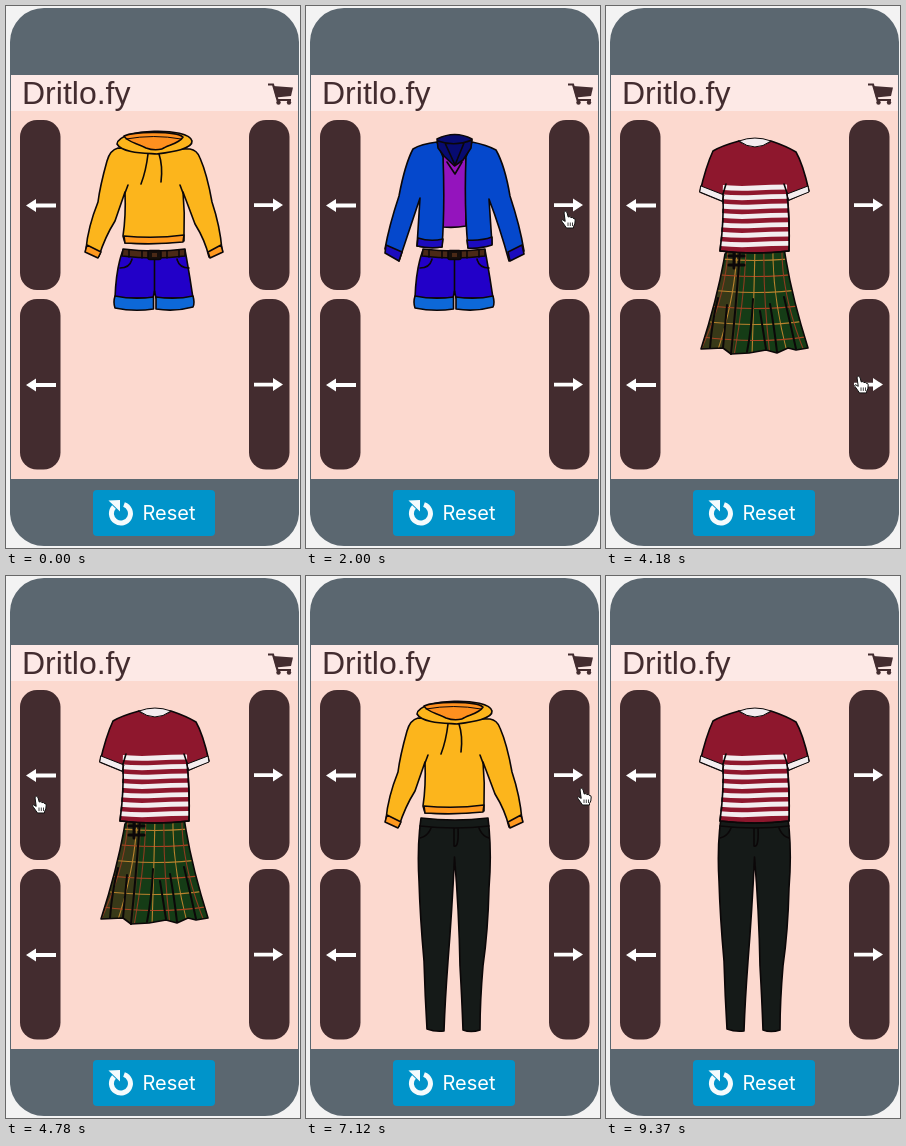
These frames come from a looping animation (294 by 542 pixels, 9.79 s). An HTML page:

```html
<!DOCTYPE html>
<html lang="en">
<head>
<meta charset="utf-8">
<title>Outfit picker</title>
<style>
  html, body { margin: 0; width: 100%; height: 100%; overflow: hidden; background: #f3f3f3; }
  svg { display: block; width: 294px; height: 542px; }
  .garment { stroke: #0b0708; stroke-width: 1.6; stroke-linejoin: round; stroke-linecap: round; }
  .line { fill: none; }
  .hover { filter: drop-shadow(2px 2px 2.5px rgba(0, 0, 0, .3)); }
</style>
</head>
<body>
<svg viewBox="0 0 294 542">
  <defs>
    <clipPath id="teeBody"><path d="M117 178H181L183 245Q149 248 114 245Z"/></clipPath>
    <clipPath id="skirtShape"><path d="M125 241Q150 245 178 241Q184 285 202 342L190 344 182 342 171 347 160 344 143 347 125 348 117 342 95 343Q112 290 119 248Z"/></clipPath>
    <path id="leftArrow" d="M20 199.500L30 193V197.500H50V201.500H30V206Z" fill="#fff"/>
    <path id="rightArrow" d="M277 199L267 192.500V197.300H248V200.900H267V205.500Z" fill="#fff"/>
  </defs>

  <rect x="4" y="2" width="289" height="538" rx="34" fill="#5b6770"/>
  <rect x="5" y="69" width="287" height="404" fill="#fcd9cf"/>
  <rect x="5" y="69" width="287" height="36" fill="#fde9e6"/>
  <text x="16" y="98" font-family="'Liberation Sans', Arial, sans-serif" font-size="32" fill="#432c2f">Dritlo.fy</text>

  <g fill="#432c2f">
    <path d="M262 78.500H267L271.500 94H285" fill="none" stroke="#432c2f" stroke-width="2.200"/>
    <path d="M267 80L287 81.500 285 90 270 91.500Z"/>
    <circle cx="272.500" cy="96.500" r="2.200"/><circle cx="283" cy="96.500" r="2.200"/>
    <rect x="14" y="114" width="40.500" height="170" rx="17"/>
    <rect x="243" y="114" width="40.500" height="170" rx="17"/>
    <rect x="14" y="293" width="40.500" height="170.500" rx="17"/>
    <rect x="243" y="293" width="40.500" height="170.500" rx="17"/>
  </g>
  <use href="#leftArrow"/><use href="#leftArrow" y="179.500"/>
  <use href="#rightArrow"/><use href="#rightArrow" y="179.500"/>

  <g id="reset">
    <rect x="87" y="484" width="122" height="46" rx="4" fill="#0094ca"/>
    <path d="M118 498.500A9.500 9.500 0 1 1 108 501" fill="none" stroke="#f4fbfd" stroke-width="5"/>
    <path d="M102.500 494.500L114 494V505.500Z" fill="#f4fbfd"/>
    <text x="136.500" y="514" font-family="Inter, sans-serif" font-size="20" fill="#fff">Reset</text>
  </g>

  <g id="shorts" class="garment">
    <path d="M117 244Q149 249 179 244Q183 265 187 292H150L148.500 285 147 292H109Q110 262 117 244Z" fill="#2200c8"/>
    <path d="M109 290Q128 294 147.500 291V303Q128 306 109 302Q107 296 109 290ZM150 291Q170 294 187 290Q189 297 187 301Q169 306 150 303Z" fill="#0d68d8"/>
    <path d="M117 243Q149 247 179 243V250Q149 254 116 250Z" fill="#4a2917"/>
    <rect x="142" y="244.500" width="13" height="9" rx="2" fill="#160e0b"/>
    <rect x="146" y="247" width="5" height="4" fill="#4a2917" stroke="none"/>
    <path class="line" d="M123 244V251M136 245V252M161 245V252M173 244V251M148.500 254V286M126 253Q124 262 114 262M171 253Q173 262 183 262"/>
  </g>

  <g id="pants" class="garment">
    <path d="M115 242Q149 246 182 242Q186 275 183 312Q182 355 177 390Q174 425 174 454Q165 457 157 454Q156 425 154 390Q153 335 148.500 281Q146 335 142 385Q139 425 138 455Q129 456 121 453Q119 420 118 385Q114 340 113 305Q111 270 115 242Z" fill="#151a18"/>
    <path class="line" d="M114 250Q149 254 183 250M148 252V270Q153 272 152 252M125 252Q122 260 114 262M173 252Q176 260 183 262"/>
  </g>

  <g id="skirt" class="garment">
    <g id="plaid" clip-path="url(#skirtShape)" fill="none">
      <rect x="90" y="238" width="116" height="115" fill="#153c16" stroke="none"/>
      <path d="M125 238H137L127 352H90Z" fill="#57371a" fill-opacity=".55" stroke="none"/>
    </g>
    <path class="line" d="M125 241Q150 245 178 241Q184 285 202 342L190 344 182 342 171 347 160 344 143 347 125 348 117 342 95 343Q112 290 119 248Z"/>
    <path class="line" stroke-width="2" d="M134 244Q130 300 125 348M112 292Q106 315 104 342M147 293Q146 320 141 346M164 298Q168 320 171 346M178 291Q185 320 190 343M121 299L117 342M154 305L160 343"/>
    <path class="line" stroke-width="3" d="M123 250H138M123 259H138M128 247V262"/>
  </g>

  <g id="hoodie" class="garment" fill="#fcb51c">
    <path d="M112 142Q104 144 101 155Q94 180 92 196Q82 221 80 243L93 250Q99 231 109 215L119 186Q120 210 117 230L119 237Q149 239 178 235V229Q179 207 177 186L189 218Q199 234 203 251L216 244Q214 220 206 196Q201 168 194 152Q191 144 184 143Z"/>
    <path d="M81 239L95 246 92 252 79 246ZM202 246L215 239 217 246 204 252ZM118 230Q149 233 178 229L177 236Q149 239 119 237Z" fill="#ff981f"/>
    <path d="M111 138C113 122 183 121 186 135C187 143 165 146 151 148C138 147 116 147 111 138Z"/>
    <path d="M118 130C129 125 170 125 177 131C173 138 161 139 156 143Q148 145 140 142C131 137 121 136 118 130Z" fill="#ff901f"/>
    <path class="line" d="M120 133Q148 128 175 133" stroke-width="1"/>
    <path class="line" d="M142 148Q140 165 135 178M153 148Q157 160 155 176M119 187L122 179M177 187L174 179"/>
  </g>

  <g id="jacket" class="garment">
    <path d="M137 148H160V220Q149 222 137 221Z" fill="#9414bd"/>
    <path d="M131 136Q115 138 107 143Q99 158 93 190Q83 220 79 243L93 255Q104 222 114 192L111 240Q124 243 136 241Q139 200 137 151ZM166 136Q181 139 190 144Q199 160 204 190Q214 220 218 245L203 255Q194 222 183 193L186 238Q174 243 162 242Q158 200 160 151Z" fill="#0548cc"/>
    <path d="M80 239L96 246 93 255 79 247ZM202 246L216 239 218 248 204 255ZM112 232Q124 236 137 233L136 241Q124 243 111 240ZM161 234Q175 235 186 231V239Q173 243 162 242Z" fill="#1c0bbe"/>
    <path d="M131 133Q149 124 166 133L165 142 157 154 148.500 160 138 150 132 142Z" fill="#070b70"/>
    <path class="line" d="M132 135Q149 141 166 134M139 137L149 159 158 137M141 156L149 168 156 156"/>
  </g>

  <g id="tee" class="garment">
    <path d="M133 135Q115 140 107 145Q100 160 94 186L116 195 117 188Q118 215 114 245Q149 249 183 245Q184 215 181 187L183 194 203 185Q197 158 190 146Q180 140 165 135Q149 145 133 135Z" fill="#8e172d"/>
    <g id="stripes" clip-path="url(#teeBody)" fill="none" stroke="#f3edef" stroke-width="4.800"/>
    <path d="M133 135Q149 129 165 135Q149 147 133 135ZM95 180L118 189 116 195 94 186ZM181 188L202 180 203 186 183 194Z" fill="#f3edef" stroke-width="1"/>
    <path class="line" d="M117 188Q118 215 114 245Q149 249 183 245Q184 215 181 187M117 188L120 178M181 187L178 178"/>
  </g>

  <g id="cursor" fill="#fff" stroke="#111" stroke-linejoin="round">
    <g id="hand">
      <path d="M-2 1.500q1.500-2.500 3 0l1.200 4.500q2-1 2.600.6 2-.6 2.400.8 2-.2 2 1.600l-.4 4-1.300 2.500v1.500h-7l-3.500-5q-2.500-3-.4-3.200l2.600 1.600Z"/>
      <path d="M2 11.500V15M4.300 11.500V15M6.500 11.500V15" stroke-width=".8"/>
    </g>
    <path id="pointer" d="M0 0V14L3.300 11 5.500 16 7.800 15 5.700 10.200H10Z" fill="#111" stroke="#fff"/>
  </g>
</svg>

<script>
const LOOP = 9790;
const $ = id => document.getElementById(id);
const show = (id, on) => { $(id).style.display = on ? '' : 'none'; };

// [time, garment]
const tops = [[0, 'hoodie'], [2000, 'jacket'], [2540, 'tee'], [4960, 'jacket'],
              [5500, 'hoodie'], [7350, 'jacket'], [8010, 'tee']];
const bottoms = [[0, 'shorts'], [3410, 'pants'], [4070, 'skirt'], [6040, 'pants']];

// [first step, last step, step count, points along the way]
const moves = [
  [600, 720, 3, [[284, 196], [266, 201]]],
  [1280, 1340, 2, [[266, 201], [260, 204]]],
  [1520, 1520, 1, [[260, 204], [260, 205]]],
  [2600, 2940, 7, [[260, 205], [255, 371]]],
  [3110, 3230, 3, [[255, 371], [262, 374]]],
  [4130, 4780, 12, [[262, 374], [110, 305], [5, 245], [31, 220]]],
  [5260, 5260, 1, [[31, 220], [32, 220]]],
  [5620, 5860, 5, [[32, 220], [27, 300], [32, 357]]],
  [6220, 6700, 9, [[32, 357], [170, 270], [283, 211]]],
  [7000, 7120, 3, [[283, 211], [276, 212]]],
  [8190, 8770, 11, [[276, 212], [180, 508]]],
  [9250, 9370, 3, [[180, 508], [190, 560]]],
];

function addPath(parent, d, stroke, width) {
  const path = document.createElementNS('http://www.w3.org/2000/svg', 'path');
  path.setAttribute('d', d);
  if (stroke) path.setAttribute('stroke', stroke);
  if (width) path.setAttribute('stroke-width', width);
  $(parent).append(path);
}

for (let i = 0; i < 7; i++) {
  const y = 181 + i * 9.4;
  addPath('stripes', `M112 ${y}q18 2 36 1t37-1`);
}
for (let i = 0; i < 7; i++) {
  const top = 122 + i * 9, bottom = 92 + i * 18, y = 253 + i * 16;
  addPath('plaid', `M${top} 240Q${top - 1} 290 ${bottom} 350`, i % 2 ? '#b9822d' : '#8c3b20', 1.1);
  addPath('plaid', `M90 ${y - 3}Q150 ${y + 6} 206 ${y - 3}`, i % 2 ? '#a94422' : '#b9822d', 1.1);
}

const latest = (list, t) => list.filter(([start]) => start <= t).at(-1);

function cursorAt(t) {
  const [start, end, steps, points] = latest(moves, t);
  const step = Math.floor((t - start) / (end - start || 1) * (steps - 1) + .001) + 1;
  const k = Math.min(1, step / steps);
  const along = k * k * (3 - 2 * k) * (points.length - 1);
  const i = Math.min(points.length - 2, Math.floor(along));
  return points[i].map((v, axis) => v + (points[i + 1][axis] - v) * (along - i));
}

function draw(t) {
  const top = latest(tops, t)[1], bottom = latest(bottoms, t)[1];
  for (const id of ['hoodie', 'jacket', 'tee']) show(id, id === top);
  for (const id of ['shorts', 'pants', 'skirt']) show(id, id === bottom);

  const visible = t >= 600 && t < 9370;
  show('cursor', visible);
  const [x, y] = visible ? cursorAt(t) : [0, 0];
  const onReset = x > 87 && x < 209 && y > 484 && y < 530;
  const onArrow = y > 114 && y < 464 && (x > 13 && x < 55 || x > 242 && x < 285);
  $('cursor').setAttribute('transform', `translate(${x} ${y})`);
  show('hand', onReset || onArrow);
  show('pointer', !onReset && !onArrow);
  $('reset').classList.toggle('hover', onReset);
}

const begin = performance.now();
function tick() {
  draw((performance.now() - begin) % LOOP);
  requestAnimationFrame(tick);
}
tick();
</script>
</body>
</html>
```
